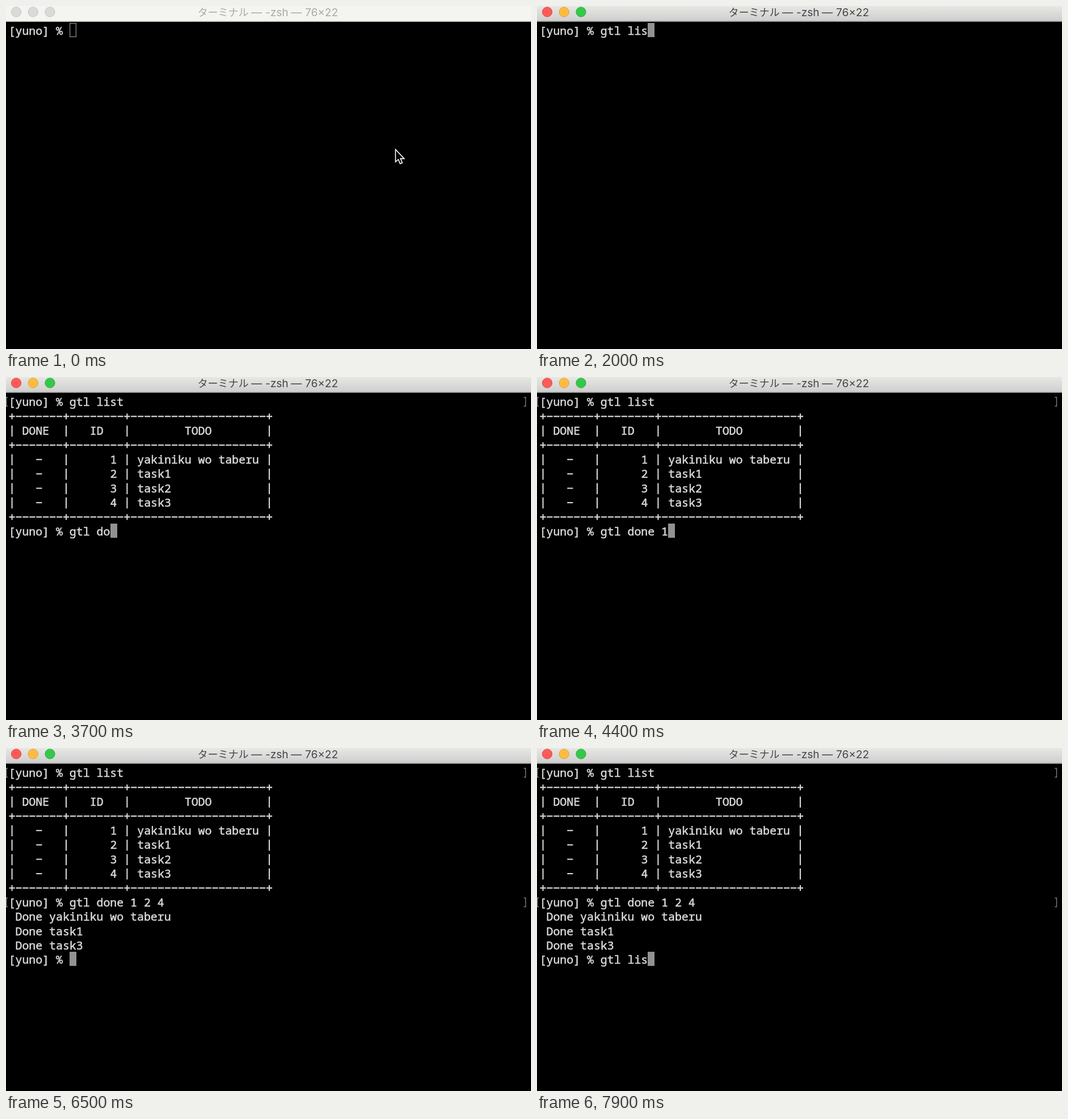
Write an HTML page that moves like this. It is 925 by 606 pixels and loops after 8000 ms.

```html
<!DOCTYPE html>
<html lang="ja">
<head>
<meta charset="utf-8">
<title>Terminal</title>
<style>
  html, body { margin: 0; width: 100%; height: 100%; overflow: hidden; background: #000; }
  svg { display: block; }
  .term text { font: 500 19.88px "Noto Sans Mono", "DejaVu Sans Mono", monospace; fill: #dcdcdc; stroke: #dcdcdc; stroke-width: .5; white-space: pre; }
  .rule { stroke: #d8d8d8; stroke-width: 2.1; fill: none; }
  .title { font: 19px Inter, Roboto, sans-serif; fill: #454545; }
  .title .ja { font: 18px "Noto Sans CJK JP", "Noto Sans CJK", sans-serif; }
  .idle .title { fill: #a9a9a9; }
  .idle .lights circle { fill: #dadada; stroke: #c4c4c4; }
  .idle #bar { fill: #f4f4f0; }
  .idle #edge { fill: #c0c0bc; }
</style>
</head>
<body>
<svg id="stage" width="925" height="606" viewBox="0 0 925 606">
  <defs>
    <linearGradient id="metal" x1="0" y1="0" x2="0" y2="1">
      <stop offset="0" stop-color="#e7e7e4"/>
      <stop offset="1" stop-color="#cecece"/>
    </linearGradient>
    <path id="beamShape" d="M682.5 244Q687 244 687 248Q687 244 691.5 244M687 248V263M682.5 267Q687 267 687 263Q687 267 691.5 267M685 256H689"/>
  </defs>
  <rect width="925" height="606"/>
  <rect id="bar" width="925" height="27" fill="url(#metal)"/>
  <rect id="edge" y="26.5" width="925" height="1.5" fill="#8f8f8f"/>
  <g class="lights">
    <circle cx="18" cy="10.5" r="8.6" fill="#fc5b57" stroke="#e2443f"/>
    <circle cx="47.7" cy="10.5" r="8.6" fill="#fdbc40" stroke="#dfa032"/>
    <circle cx="77.5" cy="10.5" r="8.6" fill="#34c84a" stroke="#24ac36"/>
  </g>
  <g class="title">
    <text class="ja" x="337.5" y="18">ターミナル</text>
    <text x="432" y="18">—</text>
    <text x="457" y="18">-zsh</text>
    <text x="502" y="18">—</text>
    <text x="527" y="18">76×22</text>
  </g>
  <g class="term" id="term"></g>
  <rect id="caret" stroke-width="1.2"/>
  <path id="arrow" d="M686.3 253.5V275.5L691.2 271L694.4 278.6L698.2 277L695 269.6H701.6Z" stroke="#fff" stroke-width="1.6"/>
  <g id="beam" fill="none" stroke-linecap="round">
    <use href="#beamShape" stroke="#6c6c68" stroke-width="3.6"/>
    <use href="#beamShape" stroke="#000" stroke-width="1.5"/>
  </g>
</svg>
<script>
const LOOP = 8000, LEFT = 4.6, TOP = 30, CELL = 11.93, ROW = 25.4;
const PROMPT = "[yuno] % ";
const $ = id => document.getElementById(id);
const term = $("term");

function add(parent, tag, attrs, text = "") {
  const el = document.createElementNS("http://www.w3.org/2000/svg", tag);
  for (const key in attrs) el.setAttribute(key, attrs[key]);
  el.textContent = text;
  parent.append(el);
  return el;
}
const colX = col => LEFT + col * CELL;
const rowY = row => TOP + row * ROW;
const midY = row => rowY(row) + 14.2;
const write = (parent, row, col, text) =>
  add(parent, "text", { x: colX(col), y: rowY(row) + 21.1 }, text);
const rule = (parent, d) => add(parent, "path", { class: "rule", d });
const dash = (col, row) => `M${colX(col) + 0.9} ${midY(row)}h10.2`;

const JOINTS = [0, 8, 17, 38];

function border(parent, row) {
  let d = "";
  for (let col = 0; col <= 38; col++) {
    d += dash(col, row);
    if (JOINTS.includes(col)) d += `M${colX(col + 0.5)} ${midY(row) - 5.2}v10.4`;
  }
  rule(parent, d);
}

function cells(parent, row, items) {
  rule(parent, JOINTS.map(col => `M${colX(col + 0.5)} ${rowY(row) + 5}v19.5`).join(""));
  for (const [col, text] of items) write(parent, row, col, text);
}

// Marks the terminal puts around a submitted prompt line
function marks(parent, row) {
  const y = Math.round(rowY(row) + 6);
  const attrs = { fill: "none", stroke: "#858585", "stroke-width": 1.3 };
  add(parent, "path", { ...attrs, d: `M3 ${y}H0.7v15.5H3` });
  add(parent, "path", { ...attrs, d: `M912.5 ${y}h3v15.5h-3` });
}

const listing = add(term, "g", {});
marks(listing, 0);
[1, 3, 8].forEach(row => border(listing, row));
cells(listing, 2, [[2, "DONE"], [12, "ID"], [26, "TODO"]]);
["yakiniku wo taberu", "task1", "task2", "task3"].forEach((task, i) => {
  cells(listing, 4 + i, [[15, String(i + 1)], [19, task]]);
  rule(listing, dash(4, 4 + i));
});

const report = add(term, "g", {});
marks(report, 9);
["yakiniku wo taberu", "task1", "task3"].forEach((task, i) =>
  write(report, 10 + i, 1, "Done " + task));

// Each command: its row, when its prompt appears, and the time of each key
const commands = [
  { row: 0, from: 0, text: "gtl list",
    keys: [1280, 1380, 1480, 1580, 1680, 1780, 1980, 2080] },
  { row: 9, from: 2380, text: "gtl done 1 2 4",
    keys: [2880, 2980, 3180, 3280, 3480, 3580, 3780, 3880, 4080, 4280, 4580, 4780, 5080, 5280] },
  { row: 13, from: 5780, text: "gtl list",
    keys: [6980, 7080, 7180, 7380, 7580, 7680, 7880] }
];
for (const cmd of commands) cmd.line = write(term, cmd.row, 0, PROMPT);

const FOCUS = 380;
const caret = $("caret");
const show = (el, on) => el.setAttribute("visibility", on ? "visible" : "hidden");

function placeCaret(row, col, focused) {
  const inset = focused ? 0 : 0.6;
  const box = {
    x: Math.round(colX(col)) + inset,
    y: Math.round(rowY(row)) + inset,
    width: 12 - 2 * inset,
    height: 25 - 2 * inset,
    fill: focused ? "#929292" : "none",
    stroke: focused ? "none" : "#929292"
  };
  for (const key in box) caret.setAttribute(key, box[key]);
}

function draw(t) {
  const focused = t >= FOCUS;
  $("stage").classList.toggle("idle", !focused);
  show($("arrow"), !focused);
  show($("beam"), focused && t < commands[0].keys[0]);
  show(listing, t >= commands[1].from);
  show(report, t >= commands[2].from);

  for (const cmd of commands) {
    const shown = t >= cmd.from;
    show(cmd.line, shown);
    if (!shown) continue;
    const count = cmd.keys.filter(time => t >= time).length;
    const text = PROMPT + cmd.text.slice(0, count);
    if (cmd.line.textContent !== text) cmd.line.textContent = text;
    placeCaret(cmd.row, text.length, focused);
  }
}

const start = performance.now();
function tick() {
  draw((performance.now() - start) % LOOP);
  requestAnimationFrame(tick);
}
tick();
</script>
</body>
</html>
```
